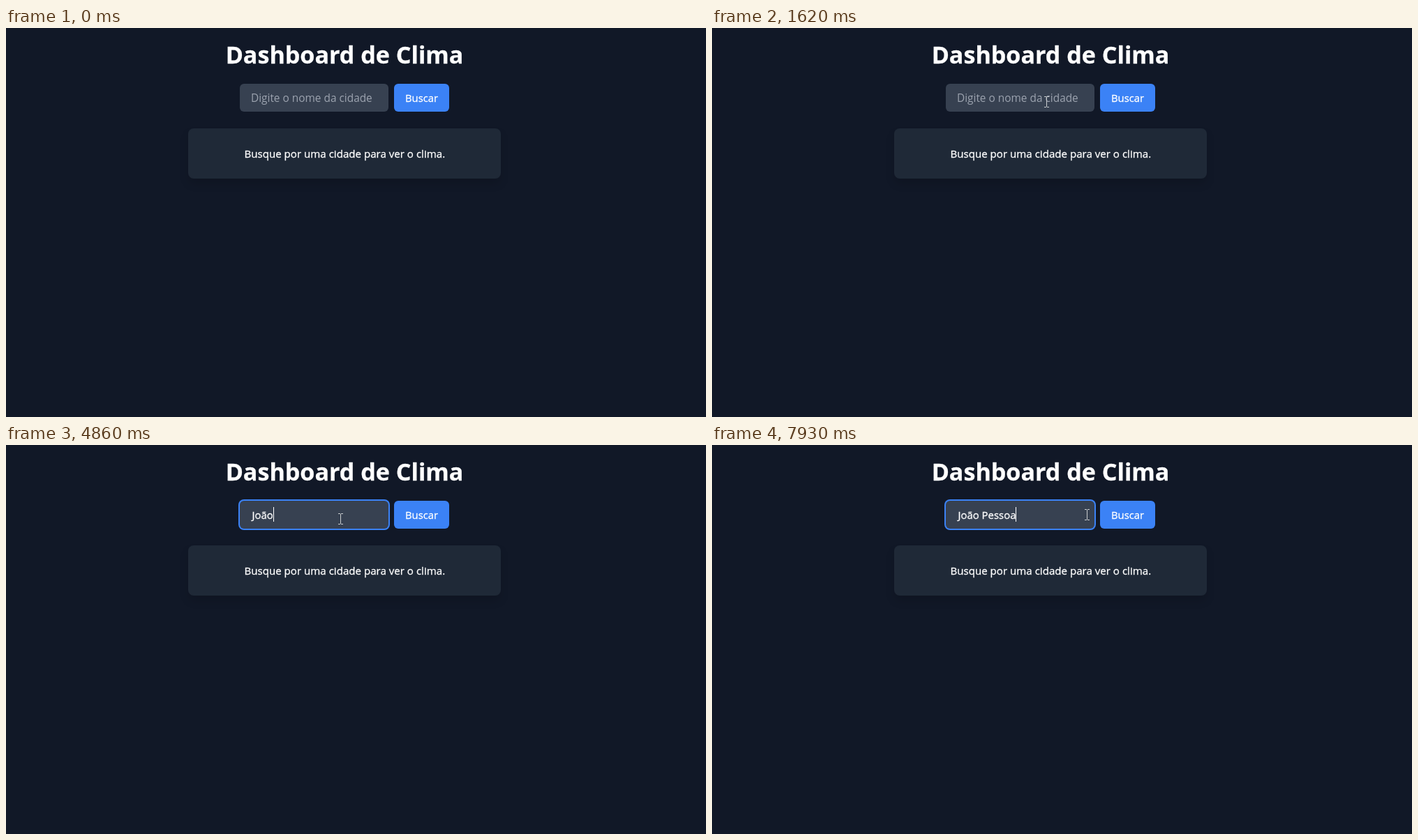
Recreate the animation shown at these times as an HTML page. Size 1003 by 558 pixels, loop 8000 ms.

```html
<!DOCTYPE html>
<html lang="pt-BR">
<head>
<meta charset="utf-8">
<title>Dashboard de Clima</title>
<style>
  html, body { margin: 0; width: 100%; height: 100%; overflow: hidden; background: #111827; }
  svg { display: block; position: absolute; left: 0; top: 0; }
  text { font-family: "Open Sans", "Noto Sans", sans-serif; font-size: 15.1px; fill: #fff; stroke: #fff; stroke-width: .3px; white-space: pre; }
  .title { font-size: 34.1px; font-weight: 700; }
  .hint { font-size: 15.4px; fill: #9ca3af; stroke: none; }
  .typed { font-size: 14.9px; }
  .button { font-size: 14.8px; }
  .card { filter: drop-shadow(0 8px 6px rgba(0, 0, 0, .12)); }
  .mid { text-anchor: middle; }
</style>
</head>
<body>
<svg width="1003" height="558" viewBox="0 0 1003 558">
  <text class="title mid" x="485" y="51">Dashboard de Clima</text>

  <rect id="ring" x="333" y="78" width="217" height="44" rx="8" fill="#3b82f6"/>
  <rect x="335" y="80" width="213" height="40" rx="6" fill="#374151"/>
  <text id="hint" class="hint" x="351" y="106">Digite o nome da cidade</text>
  <text id="typed" class="typed" x="352.5" y="106"></text>
  <rect id="caret" width="1" height="21" fill="#fff"/>

  <rect x="556" y="80" width="79" height="40" rx="6" fill="#3b82f6"/>
  <text class="button mid" x="595.5" y="106">Buscar</text>

  <rect class="card" x="261" y="144" width="448" height="72" rx="8" fill="#1f2937"/>
  <text class="mid" x="485.3" y="186">Busque por uma cidade para ver o clima.</text>

  <circle id="click" cx="477" cy="105" r="12" fill="#ff0" fill-opacity=".5"/>
  <path id="arrow" d="M0 0V16L3.7 12.6L6.2 18.2L8.6 17.2L6.2 11.7H11.2Z" fill="#fff" stroke="#000" stroke-width=".8"/>
  <path id="beam" d="M-3 -7.5H0M1 -7.5H4M.5 -7V7M-3 7.5H0M1 7.5H4" fill="none" stroke="#c9ccce" stroke-width="1"/>
</svg>
<script>
const LOOP = 8000;
const CITY = "João Pessoa";
const FOCUS = 2290;
// Caret column after each typed letter
const STOPS = [351, 356, 366, 375, 383, 387, 397, 404, 411, 418, 427, 435];
// [time, letters typed, caret visible]
const EDITS = [
  [2290, 0, 1], [2810, 0, 0], [3340, 0, 1], [3870, 0, 0],
  [4000, 1, 1], [4330, 2, 1], [4730, 3, 1], [4860, 4, 1], [5390, 4, 0],
  [5520, 5, 1], [5920, 6, 1], [6110, 7, 1], [6330, 8, 1], [6460, 9, 1],
  [6590, 10, 1], [6720, 11, 1], [7250, 11, 0], [7790, 11, 1]
];
// Stepped pointer moves along quadratic curves: a = start, c = control, b = end
const MOVES = [
  { from: 580, to: 980, steps: 6, a: [990, 353], c: [840, 195], b: [564, 170], ease: u => u * (1.5 - .5 * u) },
  { from: 980, to: 1330, steps: 5, a: [564, 170], c: [530, 155], b: [499, 128], ease: u => u * (2 - u) },
  { from: 1330, to: 1620, steps: 4, a: [499, 128], c: [489, 117], b: [479, 106], ease: u => u * (1.5 - .5 * u) },
  { from: 7650, to: 7930, steps: 4, a: [479, 106], c: [508, 103], b: [537, 100], ease: u => u * (.6 + .4 * u) }
];

const el = {};
for (const id of ["ring", "hint", "typed", "caret", "click", "arrow", "beam"])
  el[id] = document.getElementById(id);

const show = (node, on) => node.setAttribute("visibility", on ? "visible" : "hidden");
const inside = ([x, y], l, t, r, b) => x >= l && x <= r && y >= t && y <= b;
const lastBy = (list, test) => list.filter(test).pop();
const curve = (a, c, b, k) => (1 - k) ** 2 * a + 2 * k * (1 - k) * c + k * k * b;

function pointerAt(t) {
  const m = lastBy(MOVES, m => t >= m.from);
  if (!m) return null;
  const u = Math.min(1, (t - m.from) / (m.to - m.from));
  const k = m.ease(Math.floor(u * m.steps + 1e-6) / m.steps);
  return [0, 1].map(i => Math.round(curve(m.a[i], m.c[i], m.b[i], k)));
}

function drawPointer(t) {
  const p = pointerAt(t);
  const overText = p && (inside(p, 335, 80, 548, 120) || inside(p, 342, 168, 629, 192));
  show(el.beam, overText);
  show(el.arrow, p && !overText);
  if (p) (overText ? el.beam : el.arrow).setAttribute("transform", `translate(${p})`);
}

function drawField(t) {
  const [, count, caretOn] = lastBy(EDITS, e => t >= e[0]) || [0, 0, 0];
  show(el.ring, t >= FOCUS);
  show(el.click, t >= FOCUS && t < FOCUS + 130);
  show(el.hint, count === 0);
  el.typed.textContent = CITY.slice(0, count);
  show(el.caret, caretOn);
  el.caret.setAttribute("x", STOPS[count]);
  el.caret.setAttribute("y", count ? 89 : 90);
}

const start = performance.now();
function frame() {
  const t = (performance.now() - start) % LOOP;
  drawField(t);
  drawPointer(t);
  requestAnimationFrame(frame);
}
frame();
</script>
</body>
</html>
```
